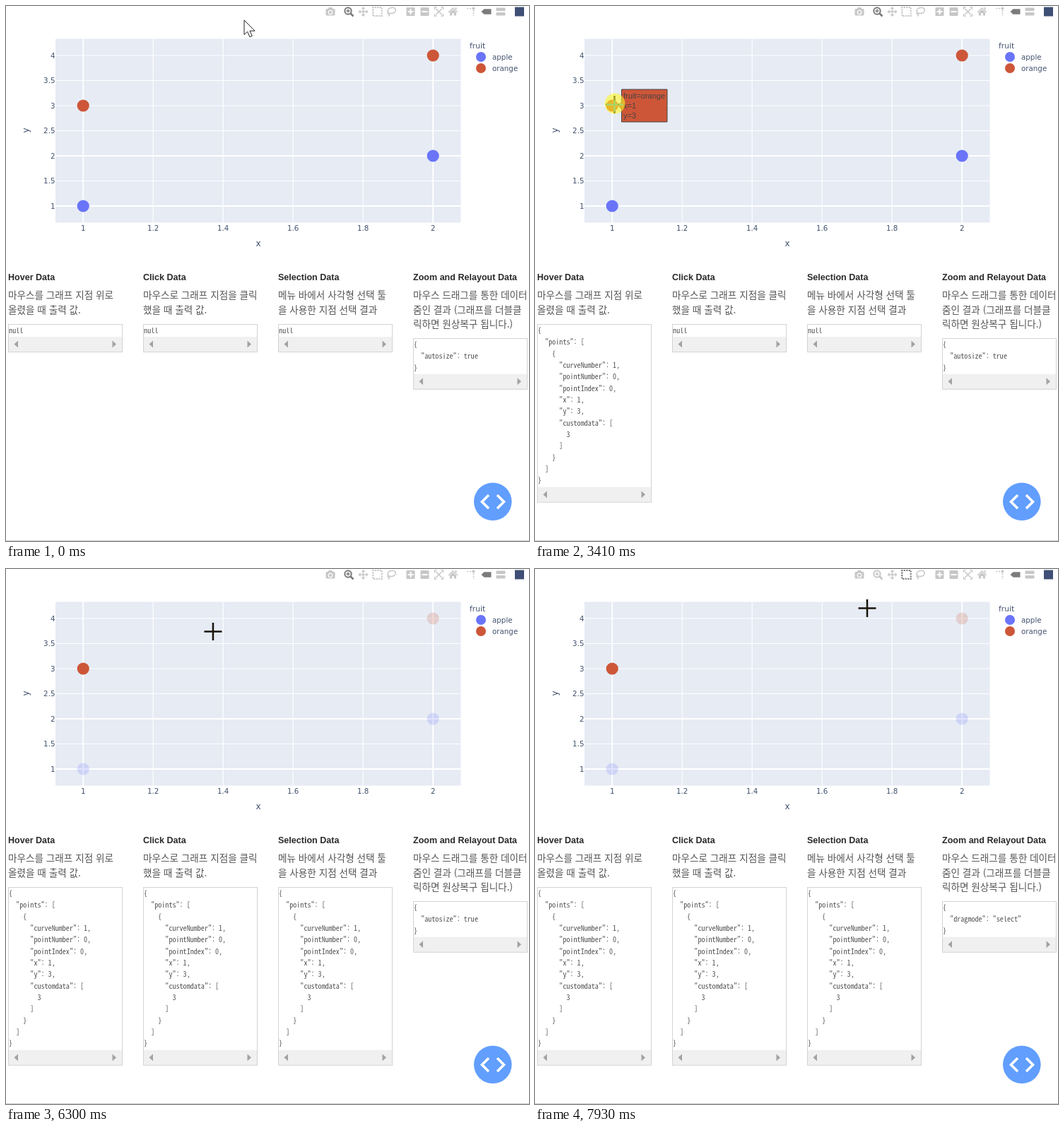
Animation, 740 px wide and 757 px high, one loop 8000 ms. Source, as an HTML page:

```html
<!DOCTYPE html>
<html lang="ko">
<head>
<meta charset="utf-8">
<style>
html, body { margin: 0; height: 100%; overflow: hidden; background: #fff; }
svg { display: block; }
.plot { font: 10.3px "DejaVu Sans", sans-serif; fill: #42526e; }
.axis { font-size: 12px; }
.legend { font-size: 10.7px; }
.arial { font: 11px "Liberation Sans", sans-serif; }
.head { font: bold 12.55px "Liberation Sans", sans-serif; fill: #2a2a2a; }
.note { font: 13.6px "Noto Sans CJK KR", "Noto Sans CJK", sans-serif; fill: #555; }
.code { font: 10.1px "Noto Sans Mono CJK KR", "Noto Sans Mono", monospace; fill: #505050; white-space: pre; }
.end { text-anchor: end; }
.mid { text-anchor: middle; }
.icon { color: #c7c7c7; fill: currentColor; stroke: none; }
.icon.on { color: #7b7b7b; }
.line { fill: none; stroke: currentColor; stroke-width: 2; }
.hole { fill: none; stroke: #fff; stroke-width: 2; }
#cross { mix-blend-mode: difference; stroke: #fff; stroke-width: 2.5; }
</style>
</head>
<body>
<svg id="stage" width="740" height="757" viewBox="0 0 740 757"></svg>
<script>
const stage = document.getElementById('stage');
const $ = id => document.getElementById(id);
const BLUE = '#6a74f8', ORANGE = '#cd5638';

const text = (x, y, s, cls) => `<text x="${x}" y="${y}" class="${cls}">${s}</text>`;
const dot = (x, y, r, color, attrs = '') => `<circle cx="${x}" cy="${y}" r="${r}" fill="${color}" ${attrs}/>`;
const path = (d, attrs) => `<path d="${d}" ${attrs}/>`;

// Chart
const px = v => 109.2 + (v - 1) * 495;
const py = v => 283 - (v - 1) * 71;
function chart() {
  let s = '<rect x="70" y="46.5" width="573.5" height="260" fill="#e6ebf4"/>';
  for (let i = 0; i < 6; i++) {
    const v = 1 + i / 5, x = px(v);
    s += path(`M${x} 46.5V306.5`, `stroke="#fff" stroke-width="${i % 5 ? 1.1 : 1.8}"`);
    s += text(x, 318, +v.toFixed(1), 'plot mid');
  }
  for (let v = 1; v <= 4; v += .5) {
    s += path(`M70 ${py(v)}H643.5`, `stroke="#fff" stroke-width="${v < 3 && v % 1 === 0 ? 1.8 : 1.1}"`);
    s += text(69.5, py(v) + 3.8, v, 'plot end');
  }
  s += text(357, 340, 'x', 'plot axis mid');
  s += `<g transform="translate(32 176) rotate(-90)">${text(0, 0, 'y', 'plot axis mid')}</g>`;
  const points = [[1, 1, BLUE], [2, 2, BLUE], [2, 4, ORANGE], [1, 3, ORANGE]];
  points.forEach(([x, y, c]) => s += dot(px(x), py(y), 8.6, c, y === 3 ? '' : 'class="other"'));
  s += text(656, 59.5, 'fruit', 'plot legend');
  s += dot(672, 72, 7, BLUE) + text(688, 76, 'apple', 'plot');
  s += dot(672, 88, 7, ORANGE) + text(688, 92, 'orange', 'plot');
  return s;
}

// Toolbar icons, each drawn around its own centre
const square = '<rect x="-6" y="-6" width="12" height="12" rx="1"/>';
const tag = y => `<rect x="-6.5" y="${y}" width="13" height="4.6" rx="1"/>`;
const icons = [
  [459, 'camera', '<rect x="-6.5" y="-4" width="13" height="9.5" rx="1.5"/><rect x="-3" y="-6" width="6" height="4" rx="1"/><circle cy="1" r="2.8" class="hole" style="stroke-width:1.3"/>'],
  [485, 'zoom', '<circle cx="-1" cy="-1" r="4.7" class="line"/><path d="M2.5 2.5L6.5 6.5" class="line" style="stroke-width:2.6"/><path d="M-3.5 -1H1.5M-1 -3.5V1.5" class="line" style="stroke-width:1.5"/>'],
  [505.5, 'pan', '<path d="M-5 0H5M0 -5V5" class="line" style="stroke-width:1.5"/><path d="M0 -7L3 -4H-3ZM0 7L3 4H-3ZM-7 0L-4 3V-3ZM7 0L4 3V-3Z"/>'],
  [525.5, 'select', '<rect x="-6.2" y="-6" width="12.4" height="12" class="line" style="stroke-width:2.2" stroke-dasharray="2.2 1.28" stroke-dashoffset="1.1"/>'],
  [545.5, 'lasso', '<ellipse cx=".5" cy="-1.5" rx="5.7" ry="4" class="line" style="stroke-width:1.6" transform="rotate(-12)"/><path d="M-4.5 1Q-6.5 3 -4 3.5T-4.5 6.5" class="line" style="stroke-width:1.5"/>'],
  [572.5, 'plus', square + '<path d="M-4 0H4M0 -4V4" class="hole"/>'],
  [592.5, 'minus', square + '<path d="M-4 0H4" class="hole"/>'],
  [612.5, 'auto', '<path d="M-6 -3V-6H-3M3 -6H6V-3M6 3V6H3M-3 6H-6V3" class="line" style="stroke-width:1.4"/><path d="M-4 -4L4 4M4 -4L-4 4" class="line" style="stroke-width:1.6"/>'],
  [632.5, 'home', '<path d="M0 -6L7 .5L6 1.5L0 -4L-6 1.5L-7 .5ZM3 -6H5V-2L3 -4ZM-4.5 1L0 -3L4.5 1V5.5H1.3V2H-1.3V5.5H-4.5Z"/>'],
  [657.5, 'spike', '<path d="M-5 -4.5H3M4 -2V6" class="line" style="stroke-width:1.6" stroke-dasharray="2 1.5"/><circle cx="4" cy="-4.5" r="2"/>'],
  [679.5, 'closest', '<path d="M-7 0L-3 -3.7H7V3.7H-3Z"/>'],
  [700, 'compare', tag(-5.5) + tag(.9)]
];
const toolbar = () => icons.map(([x, id, body]) =>
  `<g id="${id}" class="icon ${id === 'closest' ? 'on' : ''}" transform="translate(${x} 8)">${body}</g>`
).join('') + '<rect x="720" y="1.5" width="13" height="13" fill="#3f4f75"/>';

// Output columns
const columns = [
  [3.5, 'Hover Data', ['마우스를 그래프 지점 위로', '올렸을 때 출력 값.']],
  [194.5, 'Click Data', ['마우스로 그래프 지점을 클릭', '했을 때 출력 값.']],
  [385.5, 'Selection Data', ['메뉴 바에서 사각형 선택 툴', '을 사용한 지점 선택 결과']],
  [576.5, 'Zoom and Relayout Data', ['마우스 드래그를 통한 데이터', '줌인 결과 (그래프를 더블클', '릭하면 원상복구 됩니다.)']]
];
const column = ([x, title, lines], i) => text(x - .5, 388, title, 'head') +
  lines.map((l, k) => text(x - .5, 414 + k * 20.5, l, 'note')).join('') +
  `<g id="panel${i}" transform="translate(${x} ${lines.length === 3 ? 470.5 : 450.5})"></g>`;

function panel(i, value) {
  const box = $('panel' + i), key = JSON.stringify(value);
  if (box.dataset.key === key) return;
  box.dataset.key = key;
  const lines = JSON.stringify(value, null, 2).split('\n');
  const bar = 17.6 + (lines.length - 1) * 16.35, y = bar + 10.5;
  box.innerHTML = `<rect y="${bar}" width="161" height="21.5" fill="#f0f0f0"/>` +
    path(`M8 ${y}l5.5 -5v10zM152.5 ${y}l-5.5 -5v10z`, 'fill="#a3a3a3"') +
    `<rect width="161" height="${bar + 21.5}" fill="none" stroke="#d3d3d3"/>` +
    lines.map((l, k) => text(.6, 12.6 + k * 16.32, l, 'code')).join('');
}

const hoverLabel = `<g id="label">
  ${path('M118 141L122.5 136V118H187V164H122.5V146Z', `fill="${ORANGE}" stroke="#444"`)}
  <g fill="#444">${['fruit=orange', 'x=1', 'y=3'].map((s, i) => text(125, 131 + i * 14.2, s, 'arial')).join('')}</g></g>`;

const tooltip = `<g id="tip">${path('M525.5 18l5 5h-10z', 'fill="#69738a"')}
  <rect x="471" y="23" width="70" height="24" rx="2" fill="#69738a"/>
  <g fill="#fff">${text(479.5, 38.5, 'Box Select', 'arial')}</g></g>`;

const pointers = path('M0 0V20.5L4.6 16.3L8 23.8L11.3 22.3L8 15.2H15Z', 'id="arrow" fill="#fff" stroke="#222"') +
  path('M-2 1.5Q0 -1.5 2 1.5V9Q4.5 7.5 5.5 10Q8 8.7 9 11Q12.3 10 12.3 13V20Q12 24 9.5 28H-1Q-2 24 -5 20.5L-8 16.5Q-8 13 -4.5 15L-2 17.5Z M2 9V14M5.5 10V14.5M9 11V15',
    'id="hand" fill="#fff" stroke="#222" stroke-width="1.3"') +
  path('M-12.5 0H12.5M0 -12.5V12.5', 'id="cross"');

stage.innerHTML = '<rect width="740" height="757" fill="#fff"/>' + chart() + toolbar() +
  columns.map(column).join('') + path('M0 756.5H740', 'stroke="#ccc"') +
  dot(688.8, 701.3, 26.8, '#619efe') +
  path('M683 692L673.5 701.5L683 711M695 692L704.5 701.5L695 711', 'fill="none" stroke="#fff" stroke-width="3.6"') +
  hoverLabel + tooltip + pointers + dot(0, 0, 14.5, '#fffa20', 'id="click" opacity=".58"');

// Pointer moves: start time, number of steps, destination
const STEP = 69;
const moves = [
  [1320, 11, 118, 147], [2080, 3, 112.5, 139.5], [5950, 1, 119.5, 138.5],
  [6020, 11, 521, 23], [6779, 1, 522, 12], [7790, 3, 470, 55.5]
];
function pointerAt(t) {
  let x = 337, y = 20;
  for (const [start, steps, toX, toY] of moves) {
    if (t < start) break;
    const p = Math.min(1, (Math.floor((t - start) / STEP) + 1) / steps);
    const ease = p * p * (3 - 2 * p);
    x += (toX - x) * ease;
    y += (toY - y) * ease;
  }
  return [x, y];
}

const during = (t, a, b) => t >= a && t < b;
const show = (id, on) => $(id).setAttribute('visibility', on ? 'visible' : 'hidden');
const picked = { points: [{ curveNumber: 1, pointNumber: 0, pointIndex: 0, x: 1, y: 3, customdata: [3] }] };

function draw(now) {
  const t = now % 8000, [x, y] = pointerAt(t);
  const kind = y > 46 ? 'cross' : y < 17 ? 'hand' : 'arrow';
  for (const id of ['arrow', 'hand', 'cross']) {
    show(id, id === kind);
    $(id).setAttribute('transform', `translate(${x} ${y})`);
  }
  const firstClick = during(t, 3410, 3550);
  show('click', firstClick || during(t, 7320, 7450));
  $('click').setAttribute('transform', firstClick ? 'translate(113 138)' : 'translate(521.5 16)');
  show('label', during(t, 2080, 6160));
  show('tip', during(t, 6848, 7790));
  $('zoom').classList.toggle('on', t < 7590);
  $('select').classList.toggle('on', t >= 6848);
  document.querySelectorAll('.other').forEach(d => d.setAttribute('opacity', t < 3620 ? 1 : .2));
  [2150, 3690, 3755].forEach((start, i) => panel(i, t < start ? null : picked));
  panel(3, t < 7590 ? { autosize: true } : { dragmode: 'select' });
  requestAnimationFrame(draw);
}
requestAnimationFrame(draw);
</script>
</body>
</html>
```
